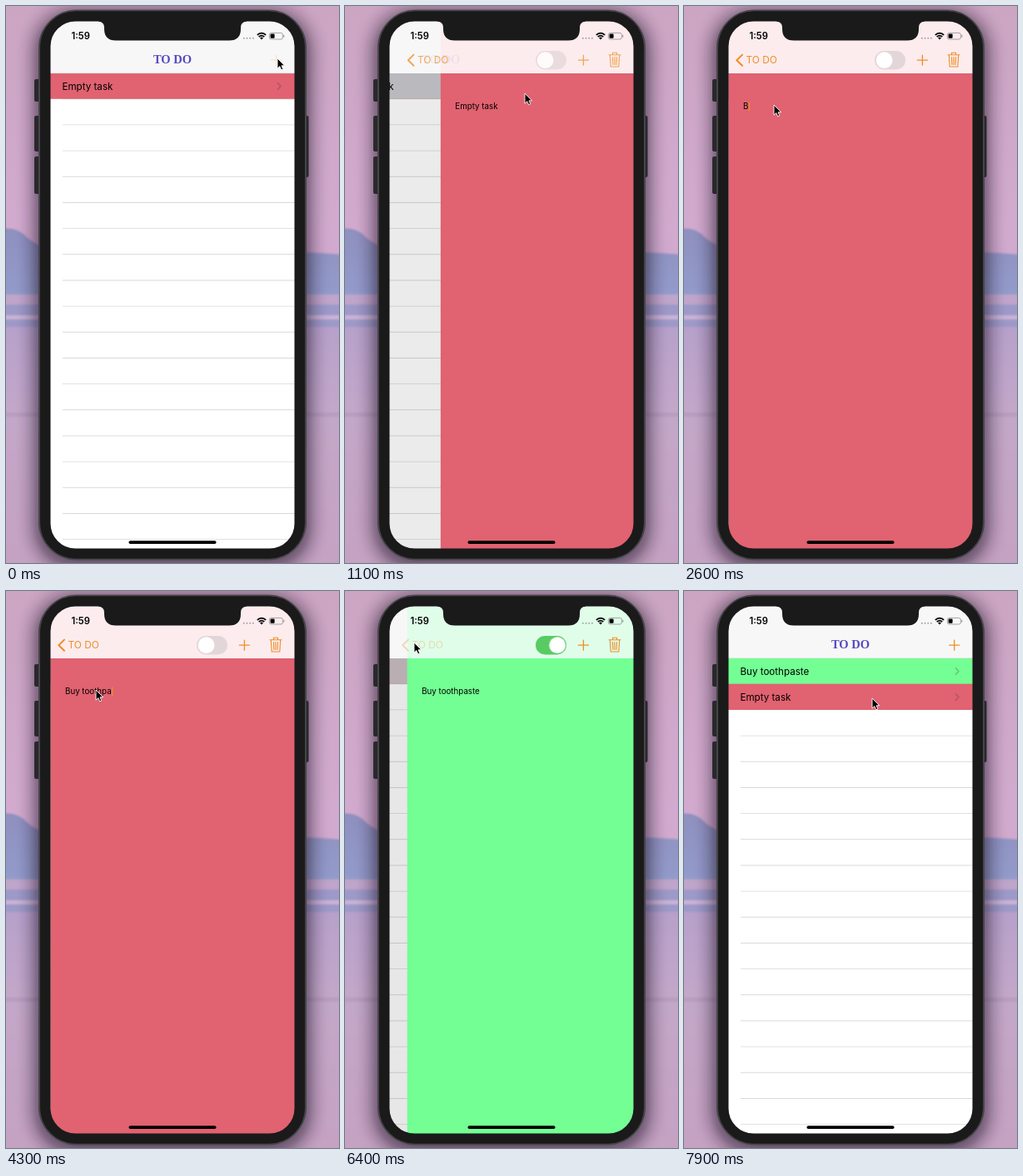
These frames come from a looping animation (400 px wide and 670 px high, 8000 ms). An HTML page:

```html
<!DOCTYPE html>
<html lang="en">
<head>
<meta charset="utf-8">
<title>To-do app demo</title>
<style>
  html, body { margin: 0; width: 100%; height: 100%; overflow: hidden; background: #c79fc3; }
  svg { display: block; width: 400px; height: 670px; }
  text { font-family: Inter, Roboto, sans-serif; font-size: 11.6px; fill: #000; }
  .title { font: bold 14.5px "Liberation Serif", serif; fill: #5548c0; text-anchor: middle; }
  .clock { font-size: 11.2px; font-weight: 600; }
  .orange { fill: none; stroke: #ee8e26; stroke-width: 1.3; stroke-linecap: round; stroke-linejoin: round; }
  .back-label { font-size: 11.9px; fill: #ee8e26; }
  .chevron { fill: none; stroke: #3c3c43; stroke-opacity: .32; stroke-width: 1.3; }
  .note { font-size: 9.75px; }

  .anim { animation: 8s cubic-bezier(.36, .66, .04, 1) infinite; }
  .detail { animation-name: detail; }
  .list { animation-name: list; }
  .dim { animation-name: dim; }
  .list-bar { animation-name: list-bar; }
  .list-title { animation-name: list-title; }
  .detail-bar { animation-name: detail-bar; }
  .back { animation-name: back; }
  .selected { animation-name: selected; }
  .paper { animation-name: paper; animation-timing-function: ease; }
  .bar-tint { animation-name: bar-tint; animation-timing-function: ease; }
  .track { animation-name: track; animation-timing-function: ease; }
  .knob { animation-name: knob; animation-timing-function: ease; }
  .add { animation-name: add; animation-timing-function: ease; }
  .done-row { animation-name: done-row; animation-timing-function: step-end; }
  .new-row { animation-name: new-row; animation-timing-function: step-end; }
  .cursor { animation-name: cursor; animation-timing-function: ease-in-out; }

  @keyframes detail {
    0%, 11.9% { transform: translateX(294px); }
    18.1%, 79.78% { transform: translateX(0); }
    86%, 100% { transform: translateX(294px); }
  }
  @keyframes list {
    0%, 11.9% { transform: translateX(0); }
    18.1%, 79.78% { transform: translateX(-88px); }
    86%, 100% { transform: translateX(0); }
  }
  @keyframes dim {
    0%, 11.9% { opacity: 0; }
    18.1%, 79.78% { opacity: .1; }
    86%, 100% { opacity: 0; }
  }
  @keyframes list-bar {
    0%, 11.9% { opacity: 1; }
    16%, 80.5% { opacity: 0; }
    85%, 100% { opacity: 1; }
  }
  @keyframes list-title {
    0%, 11.9% { transform: translateX(0); }
    18.1%, 79.78% { transform: translateX(-107px); }
    86%, 100% { transform: translateX(0); }
  }
  @keyframes detail-bar {
    0%, 12.5% { opacity: 0; }
    17%, 80% { opacity: 1; }
    83.5%, 100% { opacity: 0; }
  }
  @keyframes back {
    0%, 11.9% { opacity: 1; transform: translateX(60px); }
    18.1%, 78.5% { opacity: 1; transform: translateX(0); }
    79.7% { opacity: .36; transform: translateX(0); }
    84%, 100% { opacity: 0; transform: translateX(40px); }
  }
  @keyframes selected {
    0%, 10.4% { opacity: 0; }
    10.5%, 79.78% { opacity: 1; }
    86%, 100% { opacity: 0; }
  }
  @keyframes paper {
    0%, 72.4% { fill: #e16270; }
    72.5%, 100% { fill: #73ff93; }
  }
  @keyframes bar-tint {
    0%, 72.4% { fill: #fcecee; }
    72.5%, 100% { fill: #e0fdea; }
  }
  @keyframes track {
    0%, 71.2% { fill: #e3d6d8; }
    74%, 100% { fill: #57cb62; }
  }
  @keyframes knob {
    0%, 71.2% { transform: translateX(0); }
    74%, 100% { transform: translateX(14.5px); }
  }
  @keyframes add {
    0% { opacity: .18; }
    5%, 89.8% { opacity: 1; }
    90.4%, 91.5% { opacity: .18; }
    96%, 100% { opacity: 1; }
  }
  @keyframes done-row { 0% { opacity: 0; } 86%, 100% { opacity: 1; } }
  @keyframes new-row { 0% { opacity: 0; } 91%, 100% { opacity: 1; } }
  @keyframes cursor {
    0%, 1.5% { transform: translate(326px, 63px); }
    10%, 12% { transform: translate(233px, 103px); }
    18.75% { transform: translate(112px, 118px); }
    21.5%, 64.5% { transform: translate(108px, 119px); }
    69.7%, 74.2% { transform: translate(249px, 73px); }
    78.2%, 83.8% { transform: translate(83px, 62px); }
    89.5%, 91.5% { transform: translate(326px, 63px); }
    98.7%, 100% { transform: translate(226px, 129px); }
  }
</style>
</head>
<body>
<svg viewBox="0 0 400 670">
  <defs>
    <linearGradient id="sky" x2="0" y2="1">
      <stop offset="0" stop-color="#cba5c2"/>
      <stop offset=".4" stop-color="#d2aacf"/>
      <stop offset="1" stop-color="#cfa5c6"/>
    </linearGradient>
    <linearGradient id="hill" x2="0" y2="1">
      <stop offset="0" stop-color="#8f90bf"/>
      <stop offset="1" stop-color="#939bcb"/>
    </linearGradient>
    <linearGradient id="water" x2="0" y2="1">
      <stop offset="0" stop-color="#b7a1cb"/>
      <stop offset=".35" stop-color="#c3a7c9"/>
      <stop offset="1" stop-color="#c6a2c2"/>
    </linearGradient>
    <filter id="soft" x="-20%" y="-20%" width="140%" height="140%"><feGaussianBlur stdDeviation="10"/></filter>
    <filter id="haze"><feGaussianBlur stdDeviation="1.2"/></filter>
    <clipPath id="screen"><rect x="50" y="14" width="300" height="642" rx="34"/></clipPath>
    <path id="plus" class="orange" d="M-6 0H6M0-6V6"/>
    <path id="chevron" class="chevron" d="M326 92.3l4 4.2-4 4.2"/>
  </defs>

  <rect width="400" height="670" fill="url(#sky)"/>
  <g filter="url(#haze)">
    <path fill="url(#hill)" d="M-5 268Q14 265 26 279Q36 288 60 296H340Q370 296 405 299V348H-5Z"/>
    <rect x="-5" y="347" width="410" height="12" fill="#c0a5cb"/>
    <rect x="-5" y="359" width="410" height="27" fill="#9d99c8"/>
    <rect x="-5" y="372" width="410" height="5" fill="#cbb2d6"/>
    <rect x="-5" y="386" width="410" height="290" fill="url(#water)"/>
    <rect x="-5" y="489" width="410" height="5" fill="#b79dc0"/>
  </g>
  <rect x="33" y="4" width="334" height="674" rx="50" fill="#22142a" opacity=".62" filter="url(#soft)"/>

  <g fill="#29282b">
    <rect x="34" y="88" width="8" height="27" rx="2"/>
    <rect x="34" y="132" width="8" height="43" rx="2"/>
    <rect x="34" y="181" width="8" height="45" rx="2"/>
    <rect x="357" y="132" width="6.5" height="74" rx="2"/>
  </g>
  <rect x="40" y="5.5" width="320" height="660" rx="45" fill="#1a1a1b" stroke="#454448" stroke-width="2"/>

  <g clip-path="url(#screen)">
    <g class="anim list">
      <rect x="50" y="14" width="300" height="642" fill="#fff"/>
      <path d="M207.5 111.3V652" stroke="#d9d9dc" stroke-width="279" stroke-dasharray=".9 30.27"/>
      <g>
        <rect x="50" y="81" width="300" height="30.8" fill="#e16270"/>
        <rect class="anim selected" x="50" y="81" width="300" height="30.8" fill="#cac9ce"/>
        <text x="67.5" y="100.6">Empty task</text>
        <use href="#chevron"/>
      </g>
      <g class="anim done-row">
        <rect x="50" y="81" width="300" height="30.8" fill="#73ff93"/>
        <text x="67.5" y="100.6">Buy toothpaste</text>
        <use href="#chevron"/>
      </g>
      <g class="anim new-row">
        <rect x="50" y="111.8" width="300" height="31.2" fill="#e16270"/>
        <text x="67.5" y="131.7">Empty task</text>
        <use href="#chevron" y="31.1"/>
      </g>
      <rect class="anim dim" x="50" y="81" width="400" height="575"/>
    </g>
    <rect x="50" y="14" width="300" height="67" fill="#f7f7f7"/>

    <g class="anim detail">
      <rect class="anim paper" x="53.5" y="81" width="297" height="575"/>
      <rect class="anim bar-tint" x="53.5" y="14" width="297" height="67"/>
      <text class="note" id="note" x="71" y="124.4">Empty task</text>
      <rect id="caret" y="115.5" width="1.3" height="11" fill="#ee8e26"/>
    </g>

    <g class="anim list-bar">
      <path d="M50 80.8H350" stroke="#c9c9cc" stroke-width=".5"/>
      <text class="title anim list-title" x="200" y="69.3">TO DO</text>
      <g class="anim add"><use href="#plus" x="324.7" y="65.2"/></g>
    </g>
    <g class="anim back">
      <g class="anim detail-bar">
        <path class="orange" style="stroke-width:2" d="M70 58.6L63.3 65.2L70 71.8"/>
        <text class="back-label" x="74.5" y="69.4">TO DO</text>
      </g>
    </g>
    <g class="anim detail-bar">
      <rect class="anim track" x="229" y="54" width="37" height="22.4" rx="11.2"/>
      <circle class="anim knob" cx="240.6" cy="65.2" r="9.9" fill="#fff"/>
      <use href="#plus" x="286.4" y="65.2"/>
      <path class="orange" style="stroke-width:1.1" d="M317 58.8H331M321.5 58.6V56.3H326.5V58.6M318.3 59L319.2 73H328.8L329.7 59M321.5 61.5L321.9 70.5M324 61.5V70.5M326.5 61.5L326.1 70.5"/>
    </g>
  </g>

  <!-- Bezel and status bar -->
  <rect x="47.5" y="12.5" width="305" height="646" rx="36" fill="none" stroke="#1a1a1b" stroke-width="12"/>
  <path fill="#1a1a1b" d="M111 16V18.5Q118 19 118 26V27.5Q118 41.5 132 41.5H268Q282 41.5 282 27.5V26Q282 19 289 18.5V16Z"/>
  <text class="clock" x="78.5" y="40.2">1:59</text>
  <path d="M285.8 38.8H299" stroke="#a3a3a6" stroke-width="2" stroke-linecap="round" stroke-dasharray="0 3.7"/>
  <path fill="none" stroke="#000" stroke-width="1.7" d="M301.8 34.8Q307 30.4 312.2 34.8M303.7 37Q307 34.2 310.3 37"/>
  <path d="M305 38.3Q307 36.8 309 38.3L307 40.5Z"/>
  <rect x="316.4" y="32.4" width="16" height="7.6" rx="2.2" fill="none" stroke="#8d8d90" stroke-width=".8"/>
  <rect x="317.6" y="33.6" width="5" height="5.2" rx="1"/>
  <path d="M333.8 34.8v2.8" stroke="#8d8d90"/>
  <rect x="147.5" y="643.3" width="105" height="3.7" rx="1.8"/>

  <path class="anim cursor" id="cursor" d="M0 0V12.2L2.8 9.6L4.7 13.8L6.8 12.9L5 8.8H8.8Z" stroke="#fff" stroke-width=".9"/>
</svg>
<script>
  const note = document.getElementById('note');
  const caret = document.getElementById('caret');
  const clock = document.getElementById('cursor').getAnimations()[0];
  const before = 'Empty task';
  const after = 'Buy toothpaste';
  const keyTimes = [2560, 2760, 2860, 2960, 3160, 3260, 3360, 3560, 3660, 3860, 4260, 4360, 4460, 4660];
  const eraseStart = 1860, eraseStep = 62, editStart = 1720, editEnd = 4960;

  function noteAt(t) {
    const typed = keyTimes.filter(k => k <= t).length;
    if (typed) return after.slice(0, typed);
    const erased = Math.max(0, Math.floor((t - eraseStart) / eraseStep));
    return before.slice(0, Math.max(0, before.length - erased));
  }

  function render(now) {
    const t = (clock.currentTime ?? now) % 8000;
    const text = noteAt(t);
    if (note.textContent !== text) note.textContent = text;
    caret.setAttribute('x', 71.4 + (text ? note.getComputedTextLength() : 0));
    caret.setAttribute('opacity', t >= editStart && t < editEnd ? 1 : 0);
    requestAnimationFrame(render);
  }
  requestAnimationFrame(render);
</script>
</body>
</html>
```
